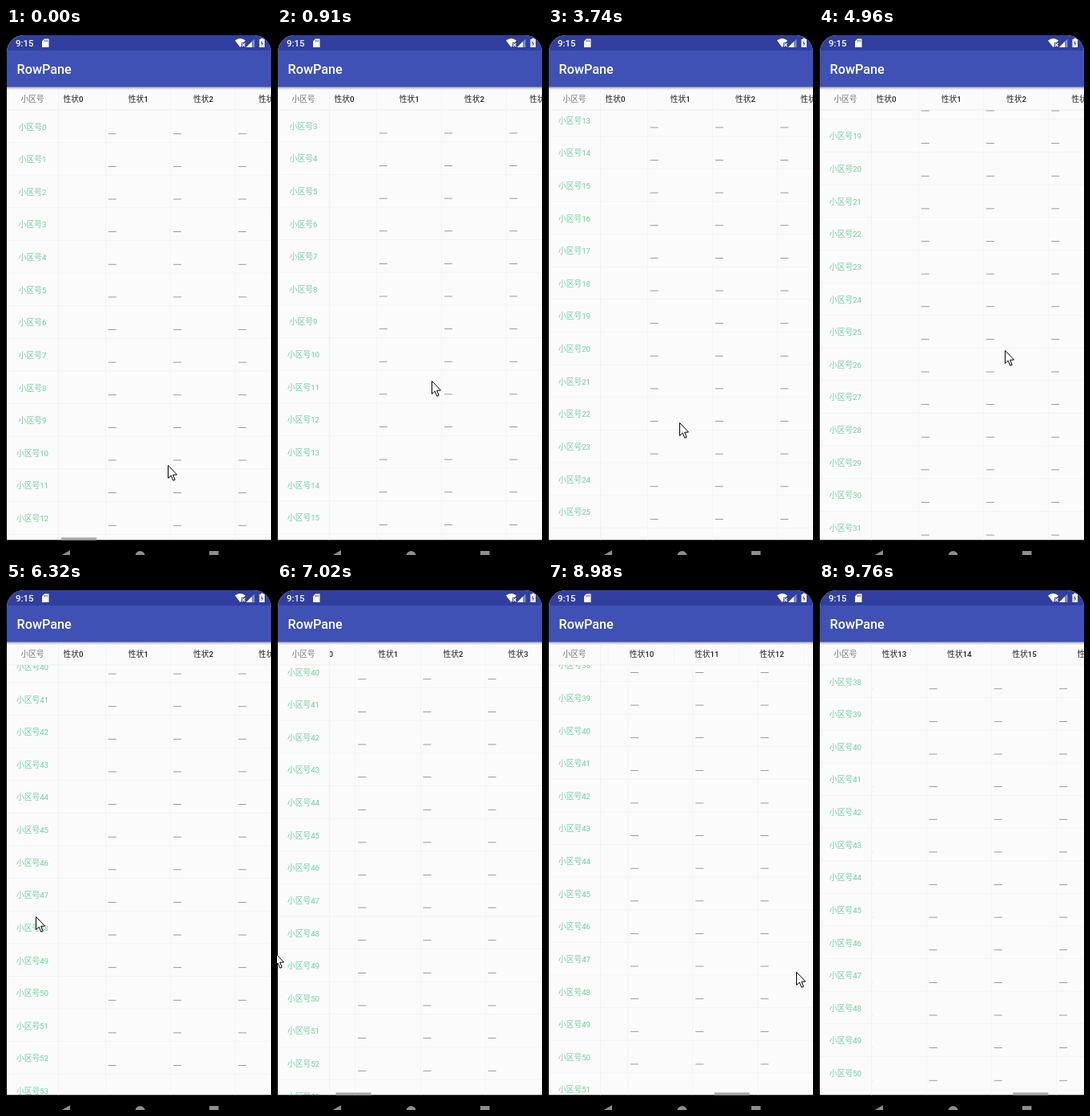
Animation of 331 by 656 pixels, one loop 9910 ms. Source, as an HTML page with a canvas:

```html
<!DOCTYPE html>
<html lang="zh">
<head>
<meta charset="utf-8">
<title>RowPane</title>
<style>
  html, body { margin: 0; width: 100%; height: 100%; overflow: hidden; background: #000; }
  canvas { display: block; }
</style>
</head>
<body>
<canvas></canvas>
<script>
const W = 331, H = 656, LOOP = 9910, REFRESH = 130;
const ROW = 40.625, COL = 81.25, LEFT = 65.5, TOP = 102, BOTTOM = 637.5;
const ROWS = 100, COLS = 20;
const FONT = 'Roboto, "Noto Sans CJK SC", "Noto Sans CJK JP", sans-serif';

const canvas = document.querySelector('canvas');
const ctx = canvas.getContext('2d');
const ratio = window.devicePixelRatio || 1;
canvas.width = W * ratio;
canvas.height = H * ratio;
canvas.style.width = W + 'px';
canvas.style.height = H + 'px';

const linear = p => p;
const easeOut = p => 1 - (1 - p) ** 2;

// Turning points of the gestures; lag is how far the header trails the body.
const POSES = [
  { at: 0, x: 22, y: 0, lag: 0, mouseX: 202, mouseY: 544 },
  { at: 1920, y: 263, mouseX: 182, mouseY: 319 },
  { at: 3740, y: 536, mouseX: 164, mouseY: 491 },
  { at: 4410, y: 760, mouseX: 224, mouseY: 395 },
  { at: 5270, mouseX: 234, mouseY: 402, ease: easeOut },
  { at: 6320, y: 1643.7, mouseX: 37, mouseY: 415, ease: easeOut },
  { at: 7020, x: 48.5, y: 1637, mouseX: -3, mouseY: 460 },
  { at: 8200, x: 8 * COL, y: 39 * ROW, lag: 115, mouseX: 275, mouseY: 484, ease: easeOut },
  { at: 9760, x: 1068.4, y: 38 * ROW, lag: 0, mouseX: 345 }
];
for (let i = 1; i < POSES.length; i++) POSES[i] = { ...POSES[i - 1], ease: linear, ...POSES[i] };

function poseAt(t) {
  const i = POSES.findIndex(pose => pose.at > t);
  if (i < 0) return POSES[POSES.length - 1];
  const from = POSES[i - 1], to = POSES[i];
  const steps = Math.round((to.at - from.at) / REFRESH);
  const step = Math.floor((t - from.at) / (to.at - from.at) * steps);
  const p = to.ease(step / steps);
  const mix = key => from[key] + (to[key] - from[key]) * p;
  return { x: mix('x'), y: mix('y'), lag: mix('lag'), mouseX: mix('mouseX'), mouseY: mix('mouseY') };
}

function thumbAlpha(t) {
  if (t > 6400) return 1;
  return Math.max(0, Math.min(1, (650 - t) / 300));
}

function rect(x, y, w, h, color) {
  ctx.fillStyle = color;
  ctx.fillRect(x, y, w, h);
}

function shape(points, color) {
  ctx.fillStyle = color;
  ctx.beginPath();
  points.forEach(([x, y]) => ctx.lineTo(x, y));
  ctx.closePath();
  ctx.fill();
}

function label(text, x, y, color, size = 9.75, weight = 400, align = 'center') {
  ctx.font = `${weight} ${size}px ${FONT}`;
  ctx.textAlign = align;
  ctx.fillStyle = color;
  ctx.fillText(text, x, y);
}

function clipped(x, y, w, h, draw, radius = 0) {
  ctx.save();
  ctx.beginPath();
  ctx.roundRect(x, y, w, h, [radius, radius, 0, 0]);
  ctx.clip();
  draw();
  ctx.restore();
}

function drawBars() {
  clipped(1, 9, W - 1, BOTTOM - 9, () => {
    rect(0, 9, W, BOTTOM - 9, '#fbfbfb');
    rect(0, 9, W, 19, '#303f9f');
    rect(0, 28, W, 45.5, '#3f51b5');
  }, 21);

  const shadow = ctx.createLinearGradient(0, 73.5, 0, 77);
  shadow.addColorStop(0, 'rgba(0,0,0,.3)');
  shadow.addColorStop(1, 'rgba(0,0,0,0)');
  rect(1, 73.5, W, 3.5, shadow);

  label('RowPane', 13.5, 57, '#fff', 16.25, 500, 'left');
  label('9:15', 12, 22.7, '#fff', 11.4, 500, 'left');
  drawStatusIcons();
  drawNavigation();
}

function drawStatusIcons() {
  shape([[48, 13.5], [53.5, 13.5], [53.5, 24], [45, 24], [45, 16.5]], '#fff');
  for (let i = 0; i < 3; i++) rect(47.8 + i * 1.8, 15, 0.8, 2.2, '#303f9f');

  ctx.fillStyle = '#fff';
  ctx.beginPath();
  ctx.moveTo(292.5, 24);
  ctx.lineTo(286, 15.5);
  ctx.quadraticCurveTo(292.5, 10.5, 299, 15.5);
  ctx.fill();
  rect(294, 18, 6, 6, '#303f9f');
  ctx.strokeStyle = '#fff';
  ctx.lineWidth = 1.1;
  ctx.beginPath();
  ctx.moveTo(294.8, 19); ctx.lineTo(298.6, 23);
  ctx.moveTo(298.6, 19); ctx.lineTo(294.8, 23);
  ctx.stroke();

  shape([[310.5, 13.5], [310.5, 24], [300, 24]], 'rgba(255,255,255,.4)');
  shape([[307, 17], [307, 24], [300, 24]], '#fff');

  rect(316.5, 14, 6.5, 10, '#fff');
  rect(318.3, 12.8, 3, 1.5, '#fff');
  shape([[320.3, 15.2], [318, 19.5], [321.6, 18.5], [319.2, 22.8]], '#303f9f');
}

function drawNavigation() {
  const gray = '#8d8d8d';
  shape([[68, 657], [80, 650], [80, 664]], gray);
  ctx.beginPath();
  ctx.arc(167.5, 657, 6, 0, Math.PI * 2);
  ctx.fill();
  rect(254, 651, 11.5, 12, gray);
}

function drawHeader(scroll) {
  label('小区号', 33, 91.7, '#757575');
  clipped(66, 76, W, TOP - 76, () => {
    for (let c = 0; c < COLS; c++) {
      const x = LEFT + c * COL - scroll;
      label('性状' + c, x + COL / 2, 91.7, '#222', 9.75, 500);
      rect(Math.floor(x + COL - 0.5), 76, 1, TOP - 76, '#f5f5f5');
    }
  });
  rect(65, 76, 1, TOP - 76, '#f2f2f2');
  rect(1, TOP - 0.5, W, 1, '#f0f0f0');
}

function drawBody(scrollX, scrollY) {
  clipped(1, TOP, W, BOTTOM - TOP, () => {
    const firstRow = Math.floor(scrollY / ROW);
    for (let r = firstRow; r < Math.min(ROWS, firstRow + 15); r++) {
      const y = TOP + r * ROW - scrollY;
      label('小区号' + r, 33, y + 24.6, '#6bcf98');
      rect(1, y + ROW - 0.5, W, 1, '#f3f3f3');
    }
    clipped(65.5, TOP, W, BOTTOM - TOP, () => {
      for (let c = 0; c < COLS; c++) {
        const x = LEFT + c * COL - scrollX;
        rect(Math.floor(x - 0.5), TOP, 1, BOTTOM - TOP, '#f5f5f5');
        for (let r = firstRow; r < firstRow + 15; r++) {
          rect(x + 3, TOP + r * ROW - scrollY + 29.35, 10, 0.8125, '#858585');
        }
      }
    });
    rect(65, TOP, 1, BOTTOM - TOP, '#f2f2f2');
  });
}

function drawThumb(scroll, alpha) {
  ctx.globalAlpha = alpha;
  rect(LEFT + scroll * 0.1656, 634.25, 44, 3.25, '#aaa');
  ctx.globalAlpha = 1;
}

function drawMouse(x, y) {
  ctx.save();
  ctx.translate(Math.round(x) + 0.5, Math.round(y) + 0.5);
  shape([[0, 0], [0, 16], [3.7, 12.6], [6.3, 18.8], [8.7, 17.8], [6.1, 11.8], [11, 11.5]], '#fff');
  ctx.strokeStyle = '#000';
  ctx.lineWidth = 1;
  ctx.stroke();
  ctx.restore();
}

function render(now) {
  const t = now % LOOP;
  const pose = poseAt(t);
  ctx.setTransform(ratio, 0, 0, ratio, 0, 0);
  rect(0, 0, W, H, '#000');
  drawBars();
  drawHeader(pose.x - pose.lag);
  drawBody(pose.x, pose.y);
  drawThumb(pose.x, thumbAlpha(t));
  drawMouse(pose.mouseX, pose.mouseY);
}

const start = performance.now();
function tick() {
  render(performance.now() - start);
  requestAnimationFrame(tick);
}
tick();
</script>
</body>
</html>
```
